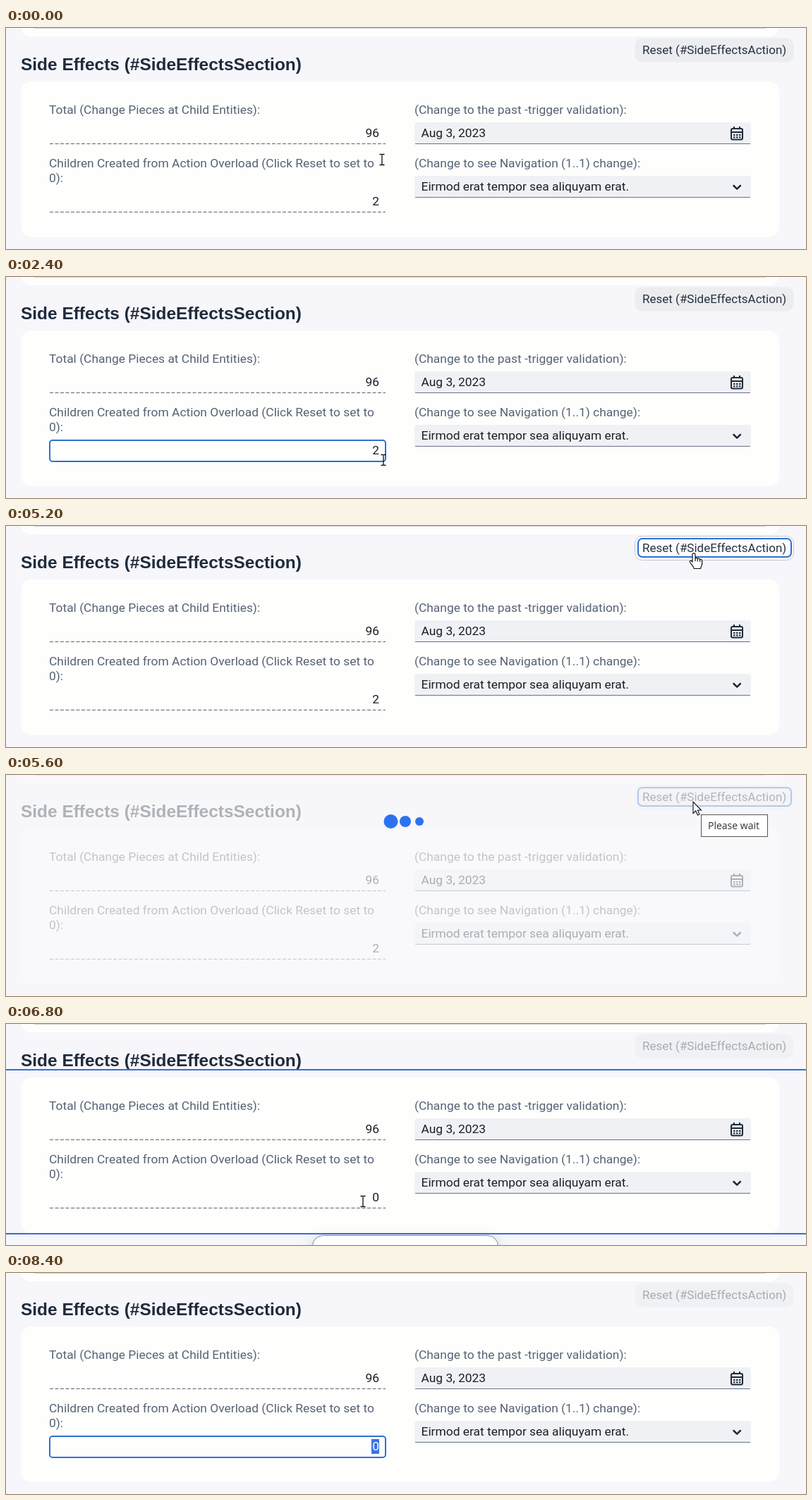
Animation, 1134 px wide and 314 px high, one loop 9.4 s. Source, as an HTML page:

```html
<!DOCTYPE html>
<html lang="en">
<head>
<meta charset="utf-8">
<title>Side Effects</title>
<style>
  html, body { margin: 0; width: 100%; height: 100%; overflow: hidden; background: #f6f6fb; }
  svg { display: block; width: 1134px; height: 314px; }
  text { font: 17.4px Roboto, "Liberation Sans", sans-serif; white-space: pre; }
  .label { fill: #566374; }
  .value { fill: #1b1f26; }
  .num { text-anchor: end; }
  .title { fill: #1f2b3b; font: bold 24.45px "Liberation Sans", Arial, sans-serif; }
  .caption { font-size: 17px; }
  .tip { fill: #333; font: 14px "Open Sans", "Noto Sans", sans-serif; }
  .dash { stroke: #5d636c; stroke-dasharray: 5 2.5; }
  .field { fill: #eff1f4; }
  .line { stroke: #66728a; }
  .ring { fill: none; stroke: #2e70d2; stroke-width: 2; }
  .icon { fill: none; stroke: #1f2a3a; stroke-width: 2; }
  .chevron { stroke-width: 2.5; stroke-linecap: round; stroke-linejoin: round; }
</style>
</head>
<body>
<svg viewBox="0 0 1134 314">
  <defs>
    <filter id="glow" x="-20%" y="-50%" width="140%" height="200%">
      <feDropShadow dx="0" dy="3" stdDeviation="7" flood-color="#5a6a85" flood-opacity=".3"/>
    </filter>
  </defs>
  <rect width="1134" height="314" fill="#f6f6fb"/>
  <rect x="21" y="-40" width="1075" height="52" rx="14" fill="#fefefd"/>
  <path d="M40 .5H1077" stroke="#d3d4d6"/>
  <text class="title" x="21" y="60">Side Effects (#SideEffectsSection)</text>
  <rect x="21" y="76" width="1075.5" height="221" rx="15" fill="#fefefd"/>

  <text class="label" x="61" y="122">Total (Change Pieces at Child Entities):</text>
  <text class="value num" x="529" y="155">96</text>
  <path class="dash" d="M62 164.5H538"/>
  <text class="label" x="61" y="198">Children Created from Action Overload (Click Reset to set to</text>
  <text class="label" x="61" y="219">0):</text>
  <path class="dash" id="under" d="M62 261.5H538"/>
  <rect class="ring" id="focus" x="62" y="232" width="476" height="30" rx="4"/>
  <rect id="mark" x="518" y="236" width="11" height="21" fill="#3a74e4"/>
  <text class="value num" id="count" x="529" y="252">2</text>

  <text class="label" x="579" y="122">(Change to the past -trigger validation):</text>
  <rect class="field" x="579" y="134" width="477" height="31" rx="4"/>
  <path class="line" d="M580 164.5H1055"/>
  <text class="value" x="588.5" y="155">Aug 3, 2023</text>
  <g class="icon">
    <rect x="1028" y="143" width="16" height="15.5" rx="2"/>
    <path d="M1032 140v4M1040 140v4M1028 148h16"/>
    <path d="M1031 152h10.5M1031 155.3h10.5" stroke-dasharray="2.5 1.5"/>
  </g>
  <text class="label" x="579" y="198">(Change to see Navigation (1..1) change):</text>
  <rect class="field" x="579" y="210" width="477" height="31" rx="4"/>
  <path class="line" d="M580 240.5H1055"/>
  <text class="value" x="588.5" y="231">Eirmod erat tempor sea aliquyam erat.</text>
  <path class="icon chevron" d="M1031.5 224l4.7 4.7 4.7-4.7"/>

  <rect id="button" x="891.5" y="14.5" width="225" height="34" rx="10"/>
  <rect class="ring" id="pressed" x="896" y="18" width="217" height="26" rx="6"/>
  <text class="caption" id="caption" x="902" y="37">Reset (#SideEffectsAction)</text>

  <rect class="ring" id="section" x="-6" y="65" width="1146" height="233"/>
  <rect id="toast" x="434.5" y="300.5" width="263" height="60" rx="15" fill="#fefefe" stroke="#858c98" filter="url(#glow)"/>

  <g id="busy">
    <rect width="1134" height="314" fill="#f8f8fa" opacity=".66"/>
    <g fill="#2b72f2">
      <circle cx="545.5" cy="66"/><circle cx="566" cy="66"/><circle cx="586" cy="66"/>
    </g>
  </g>
  <g id="tip">
    <rect x="985.5" y="56.5" width="94" height="31" fill="#fff" stroke="#555"/>
    <text class="tip" x="995" y="77">Please wait</text>
  </g>

  <path id="beam" d="M-3.5 -7.5H-1L0 -6.8L1 -7.5H3.5M0 -7V7M-3.5 7.5H-1L0 6.8L1 7.5H3.5" fill="none" stroke="#111" stroke-width="1.3"/>
  <path id="arrow" d="M0 0V16.5L3.8 13L6.4 19L9 17.8L6.4 12H11.5Z" fill="#fff" stroke="#111" stroke-width="1.1"/>
  <path id="hand" d="M-2 2C-2-.6 2-.6 2 2V8C2.4 6.5 5.3 6.6 5.4 8.5C6 7.2 8.6 7.5 8.7 9.5C9.4 8.4 11.7 8.8 11.7 11V15C11.7 17.5 10 19 9.6 22H.2C0 19.5-2.6 17.5-5.3 13.2C-6.6 11-4.4 9.8-3 11.4L-2 12.6ZM2 8V11.5M5.4 8.5V12M8.7 9.5V12.5" fill="#fff" stroke="#111" stroke-width="1.2" stroke-linejoin="round"/>
</svg>
<script>
const LOOP = 9400, STEP = 200;
const $ = id => document.getElementById(id);
const show = (id, on) => { $(id).style.display = on ? '' : 'none'; };

// pointer: [ms, shape, x, y], eased over the span up to the next entry
const pointer = [
  [0, 'beam', 533, 187], [600, 'beam', 533, 187], [1200, 'beam', 533, 192],
  [1800, 'beam', 535, 254], [2000, 'arrow', 529, 267], [2200, 'beam', 535, 264],
  [2400, 'beam', 535, 260], [2800, 'beam', 526, 250], [3400, 'beam', 526, 249],
  [3600, 'arrow', 553, 236], [4200, 'hand', 957.5, 43], [4800, 'hand', 973, 40],
  [5200, 'hand', 975, 38.5], [5400, 'arrow', 974, 38], [6000, 'arrow', 974, 38],
  [6600, 'beam', 545, 240], [6800, 'beam', 506, 252], [7200, 'beam', 523, 248],
  [7600, 'beam', 527, 249], [8000, 'arrow', 527, 285], [8200, 'arrow', 527, 305],
  [8400, 'none', 527, 320]
];
const dotSizes = { 5400: [7, 6, 6], 5600: [10, 8, 6], 5800: [7, 10, 8] };
const buttonLooks = {
  idle: ['#ebedef', 'none', '#28323f'],
  hover: ['#fefefe', '#c6c8cd', '#28323f'],
  off: ['#f0f1f4', 'none', '#a9abb1']
};

function movePointer(t) {
  let i = pointer.length - 1;
  while (pointer[i][0] > t) i--;
  const [t0, shape, x0, y0] = pointer[i];
  const [t1, , x1, y1] = pointer[i + 1] || [LOOP, '', x0, y0];
  const u = (t - t0) / (t1 - t0), k = u * u * (3 - 2 * u);
  for (const id of ['beam', 'arrow', 'hand']) show(id, id === shape);
  if (shape !== 'none')
    $(shape).setAttribute('transform', `translate(${x0 + (x1 - x0) * k} ${y0 + (y1 - y0) * k})`);
}

function draw(now) {
  const t = Math.floor((now % LOOP) / STEP) * STEP;
  const within = (a, b) => t >= a && t < b;
  const focused = within(2200, 5000) || t >= 7200;
  const marked = within(2800, 5000) || t >= 7400;
  const busy = within(5400, 6000);

  show('focus', focused);
  show('under', !focused);
  show('mark', marked);
  $('count').textContent = t < 6000 ? '2' : '0';
  $('count').style.fill = marked ? '#fff' : '';

  const look = t >= 6000 ? 'off' : within(4200, 5400) ? 'hover' : 'idle';
  const [fill, stroke, ink] = buttonLooks[look];
  $('button').setAttribute('fill', fill);
  $('button').setAttribute('stroke', stroke);
  $('caption').setAttribute('fill', ink);
  show('pressed', within(5000, 6000));

  show('section', within(6000, 7200));
  show('toast', within(6200, 8000));
  $('toast').style.opacity = t === 6200 || t === 7800 ? 0.5 : 1;

  show('busy', busy);
  show('tip', within(5600, 6000));
  if (busy) document.querySelectorAll('#busy circle').forEach((c, i) => c.setAttribute('r', dotSizes[t][i]));
  movePointer(t);
}

const start = performance.now();
function tick() {
  draw(performance.now() - start);
  requestAnimationFrame(tick);
}
tick();
</script>
</body>
</html>
```
